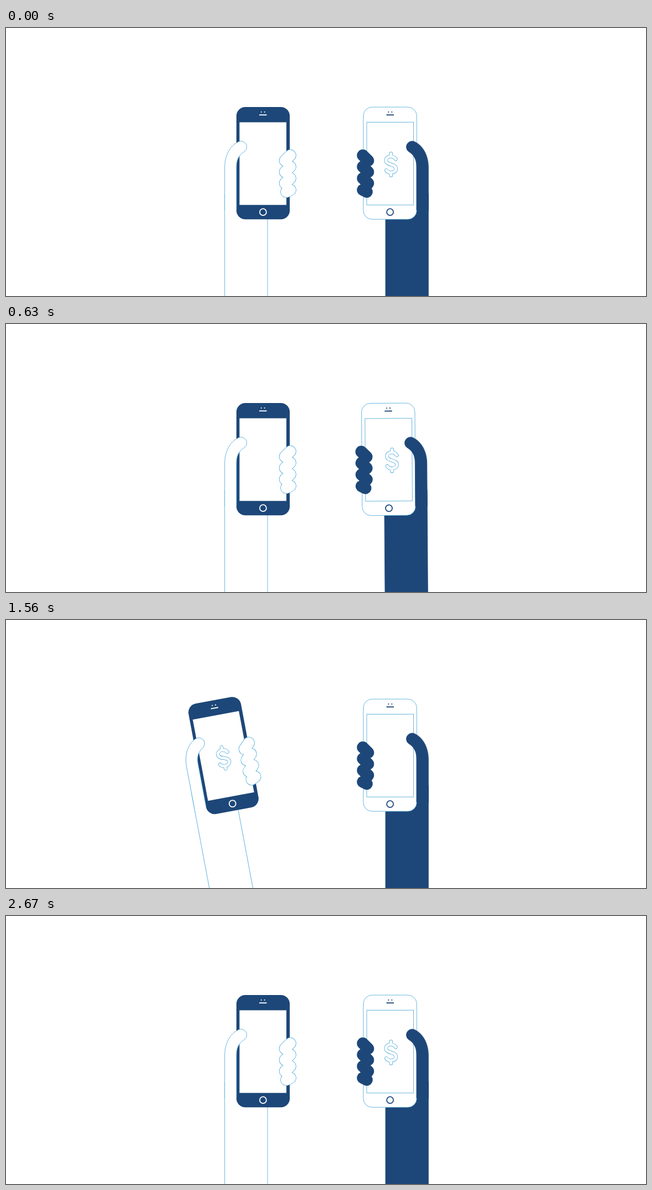
An HTML page for the animation above (2700 ms loop, 1155 by 485 pixels).

```html
<!DOCTYPE html>
<html lang="en">
<head>
<meta charset="utf-8">
<title>Phone to phone payment</title>
<style>
  html, body { margin: 0; width: 100%; height: 100%; overflow: hidden; background: #fff; }
  svg { display: block; width: 100%; height: 100%; }
</style>
</head>
<body>
<svg id="stage" viewBox="0 0 1155 485"></svg>
<script>
const NAVY = '#1d4778', LINE = '#45a5d8', WHITE = '#fff';
const HALF = 1350, STEP = 30, MIRROR = 1157;
const PIVOT = { x: 725.5, y: 630 };

const THUMB = 'V252C762.3 230 752 212.5 737.3 205.7A10.5 10.5 0 0 0 726.7 223.7C735.5 229 741 237 741 251V330';
const FINGERS = 'M644 230.5L653.5 240M644 251L653.5 260.5M644 272L653.5 281M644 293L651 296.5';
const DOLLAR = 'M8.6 -9.5C6.5 -13 3 -14.6 -.5 -14.6C-5.5 -14.6 -9 -11.5 -9 -7.6' +
  'C-9 2.2 9 -2 9 7.6C9 11.8 5 14.6 .3 14.6C-3.5 14.6 -6.8 13.2 -8.6 10.4M0 -15.5V-19.8M0 15.5V19.8';

const path = (d, fill, line, width = .8) =>
  `<path d="${d}" fill="${fill}" stroke="${line}" stroke-width="${width}"/>`;

// Thick rounded stroke with a thin rim
const tube = (d, color, rim, width) =>
  `<g stroke-linecap="round" stroke-linejoin="round">${path(d, 'none', rim, width)}${path(d, 'none', color, width - 1.5)}</g>`;

const box = (x, y, w, h, r, fill, line) =>
  `<rect x="${x}" y="${y}" width="${w}" height="${h}" rx="${r}" fill="${fill}" stroke="${line}" stroke-width=".8"/>`;

function back(skin, rim, body, edge, ink) {
  return path('M685 1000V300H762.3V1000', skin, rim) +
    box(644.9, 143.1, 96.3, 203.1, 16, body, edge) +
    box(651, 170.6, 84.6, 149.6, 0, WHITE, edge) +
    `<circle cx="690.3" cy="152" r="1.1" fill="${ink}"/><circle cx="696.3" cy="152" r="1.1" fill="${ink}"/>` +
    path('M686.5 157.3H700', 'none', ink, 1.9) +
    `<circle cx="693.1" cy="333.2" r="6" fill="none" stroke="${ink}" stroke-width="1.8"/>`;
}

const front = (skin, rim) => path('M762.3 330' + THUMB, skin, rim) + tube(FINGERS, skin, rim, 21.5);

const flip = s => `<g transform="translate(${MIRROR}) scale(-1 1)">${s}</g>`;
const part = (side, s) => `<g class="${side}">${s}</g>`;

const stage = document.getElementById('stage');
stage.innerHTML =
  flip(part('left', back(WHITE, LINE, NAVY, 'none', WHITE))) +
  part('right', back(NAVY, NAVY, WHITE, LINE, NAVY)) +
  `<g id="dollar">${tube(DOLLAR, WHITE, LINE, 6.4)}</g>` +
  flip(part('left', front(WHITE, LINE))) +
  part('right', front(NAVY, NAVY));
const dollar = document.getElementById('dollar');

// Smooth curve through [time, value] keys, flat at every peak and at both ends
function curve(keys) {
  const rate = i => (keys[i + 1][1] - keys[i][1]) / (keys[i + 1][0] - keys[i][0]);
  const slopes = keys.map((_, i) => {
    if (!i || i === keys.length - 1) return 0;
    const a = rate(i - 1), b = rate(i);
    return a * b > 0 ? 2 * a * b / (a + b) : 0;
  });
  return t => {
    if (t <= keys[0][0]) return keys[0][1];
    const i = keys.findIndex(k => k[0] > t) - 1;
    if (i < 0) return keys[keys.length - 1][1];
    const [t0, v0] = keys[i], [t1, v1] = keys[i + 1];
    const d = t1 - t0, u = (t - t0) / d, w = 1 - u;
    return v0 * w * w * (1 + 2 * u) + v1 * u * u * (3 - 2 * u) +
      d * u * w * (slopes[i] * w - slopes[i + 1] * u);
  };
}

// Degrees away from the other hand
const swing = curve([[0, 0], [210, 10.6], [300, 13], [390, 14], [540, 10.3], [630, -.4],
  [700, -10.6], [720, -10.1], [870, -.2], [990, 0]]);
const recoil = curve([[645, 0], [720, 3.7], [750, 4.5], [870, .3], [990, 0]]);
const flight = curve([[630, 0], [702, 1]]);

// Where the dollar rests on a hand's screen
function seat(side, angle) {
  const a = angle * Math.PI / 180, left = side === 'left';
  const dx = -30.7, dy = left ? -381 : -383;
  const x = PIVOT.x + dx * Math.cos(a) - dy * Math.sin(a);
  const y = PIVOT.y + dx * Math.sin(a) + dy * Math.cos(a);
  return left ? [MIRROR - x, y, -angle] : [x, y, angle];
}

function turn(side, angle) {
  for (const g of stage.getElementsByClassName(side))
    g.setAttribute('transform', `rotate(${angle} ${PIVOT.x} ${PIVOT.y})`);
}

function draw(now) {
  const time = Math.floor(now / STEP) * STEP % (2 * HALF);
  const t = time % HALF;
  const [giver, taker] = time < HALF ? ['right', 'left'] : ['left', 'right'];
  turn(giver, swing(t));
  turn(taker, recoil(t));

  // The dollar trails the swinging hand by a few milliseconds
  const from = seat(giver, swing(t - 5)), to = seat(taker, recoil(t)), u = flight(t);
  const [x, y, angle] = from.map((v, i) => v + (to[i] - v) * u);
  dollar.setAttribute('transform', `translate(${x} ${y}) rotate(${angle})`);
}

let start;
function tick(now) {
  start ??= now;
  draw(now - start);
  requestAnimationFrame(tick);
}
draw(0);
requestAnimationFrame(tick);
</script>
</body>
</html>
```
